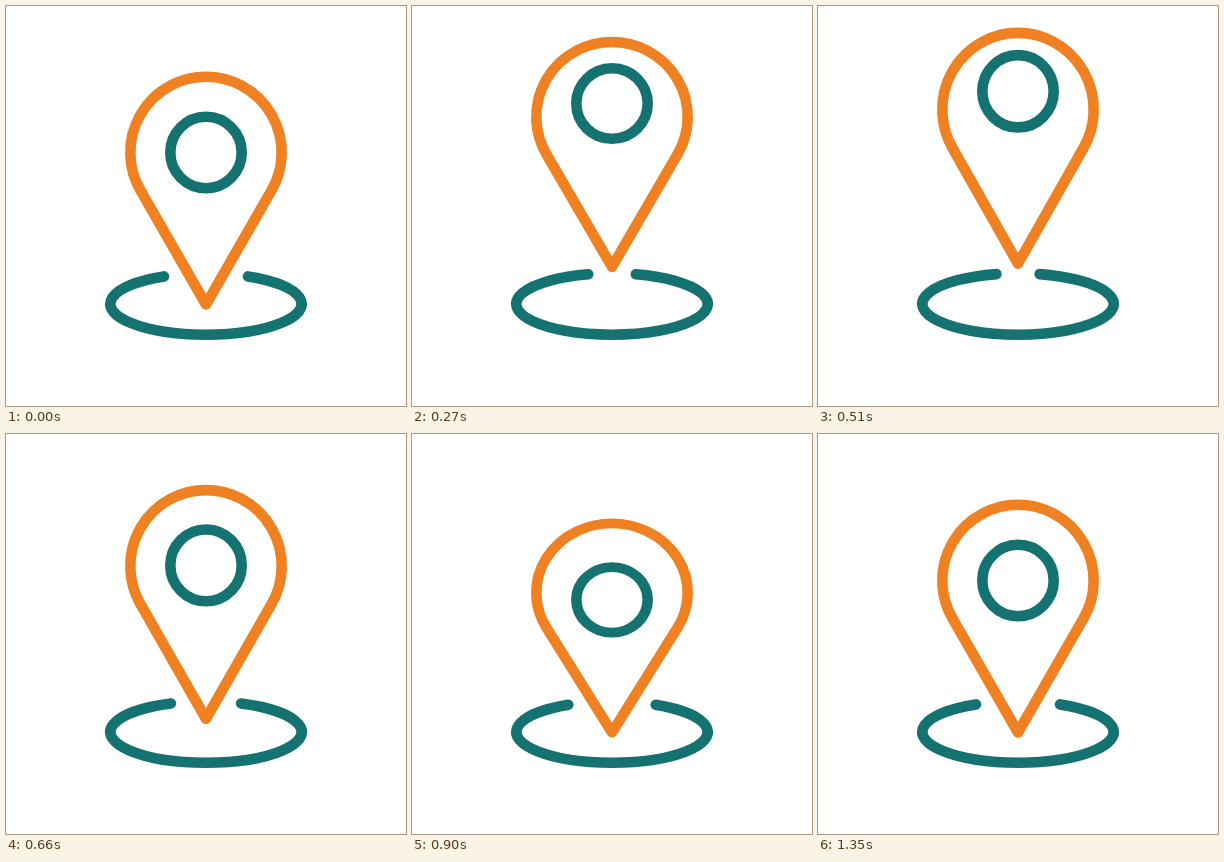
Animation, 400 px wide and 400 px high, one loop 1.91 s. Source, as an HTML page:

```html
<!DOCTYPE html>
<html lang="en">
<head>
<meta charset="utf-8">
<title>Bouncing map pin</title>
<style>
  html, body { margin: 0; width: 100%; height: 100%; overflow: hidden; background: #fff; }
  svg { display: block; width: 100%; height: 100%; }
  g { fill: none; stroke-width: 10.6; stroke-linecap: round; stroke-linejoin: round; }
</style>
</head>
<body>
<svg viewBox="0 0 400 400">
  <g stroke="#147370"><path id="ground"/></g>
  <g id="pin">
    <path id="drop" stroke="#ef8122"/>
    <circle id="ring" r="35.7" stroke="#147370"/>
  </g>
</svg>
<script>
const LOOP = 1910, STEP = 30, END = 1350;
const CX = 200, TIP = 298.5, HEAD = 152, R = 75.7;
const GROUND = { y: 298, rx: 95.7, ry: 30.7 };
const el = id => document.getElementById(id);

// Key moments in ms
const CROUCH = 95, LEAP = 117, PEAK = 400, DROP = 450, LAND = 690, SQUASH = 780, BOUNCE = 1170;

const part = (t, a, b) => Math.min(1, Math.max(0, (t - a) / (b - a)));
const smooth = (t, a, b) => { const u = part(t, a, b); return u * u * (3 - 2 * u); };
const easeIn = (t, a, b, p) => part(t, a, b) ** p;
const easeOut = (t, a, b, p) => 1 - (1 - part(t, a, b)) ** p;

function pose(t) {
  const air = easeOut(t, LEAP, PEAK, 3) - easeIn(t, DROP, LAND, 3);
  const crouch = smooth(t, 0, CROUCH) * (1 - easeOut(t, CROUCH, 430, 2));
  const recover = smooth(t, SQUASH, BOUNCE);
  const impact = easeOut(t, LAND - 10, SQUASH, 2) * (1 - recover);
  const rebound = recover - smooth(t, BOUNCE, END);
  return {
    lift: 41.6 * air,
    scale: 1 + 0.0135 * air - 0.108 * crouch - 0.111 * impact + 0.02 * rebound,
    gap: 42 - 20.7 * air + 2.2 * (crouch + impact),
    // the ring trails behind the pin
    sag: 17 * smooth(t, 0, 100) - 35 * smooth(t, 100, 320)
       + 29.7 * smooth(t, 510, SQUASH) - 11.7 * smooth(t, SQUASH, 1080)
  };
}

// Drop outline: head circle joined to the tip by its tangents, tip at 0,0
const sin = R / HEAD, cos = Math.sqrt(1 - sin * sin);
const side = HEAD * cos;
const tx = side * sin, ty = -side * cos;
el("drop").setAttribute("d", `M0 0L${-tx} ${ty}A${R} ${R} 0 1 1 ${tx} ${ty}Z`);

function draw(t) {
  const { lift, scale, gap, sag } = pose(t);
  const { y, rx, ry } = GROUND;
  const gy = y - ry * Math.sqrt(1 - (gap / rx) ** 2);
  el("ground").setAttribute("d", `M${CX + gap} ${gy}A${rx} ${ry} 0 1 1 ${CX - gap} ${gy}`);
  el("pin").setAttribute("transform", `translate(${CX} ${TIP - lift}) scale(1 ${scale})`);
  el("ring").setAttribute("cy", sag - HEAD);
}

const start = performance.now();
function tick() {
  const t = (performance.now() - start) % LOOP;
  draw(Math.min(END, Math.floor(t / STEP) * STEP));
  requestAnimationFrame(tick);
}
tick();
</script>
</body>
</html>
```
